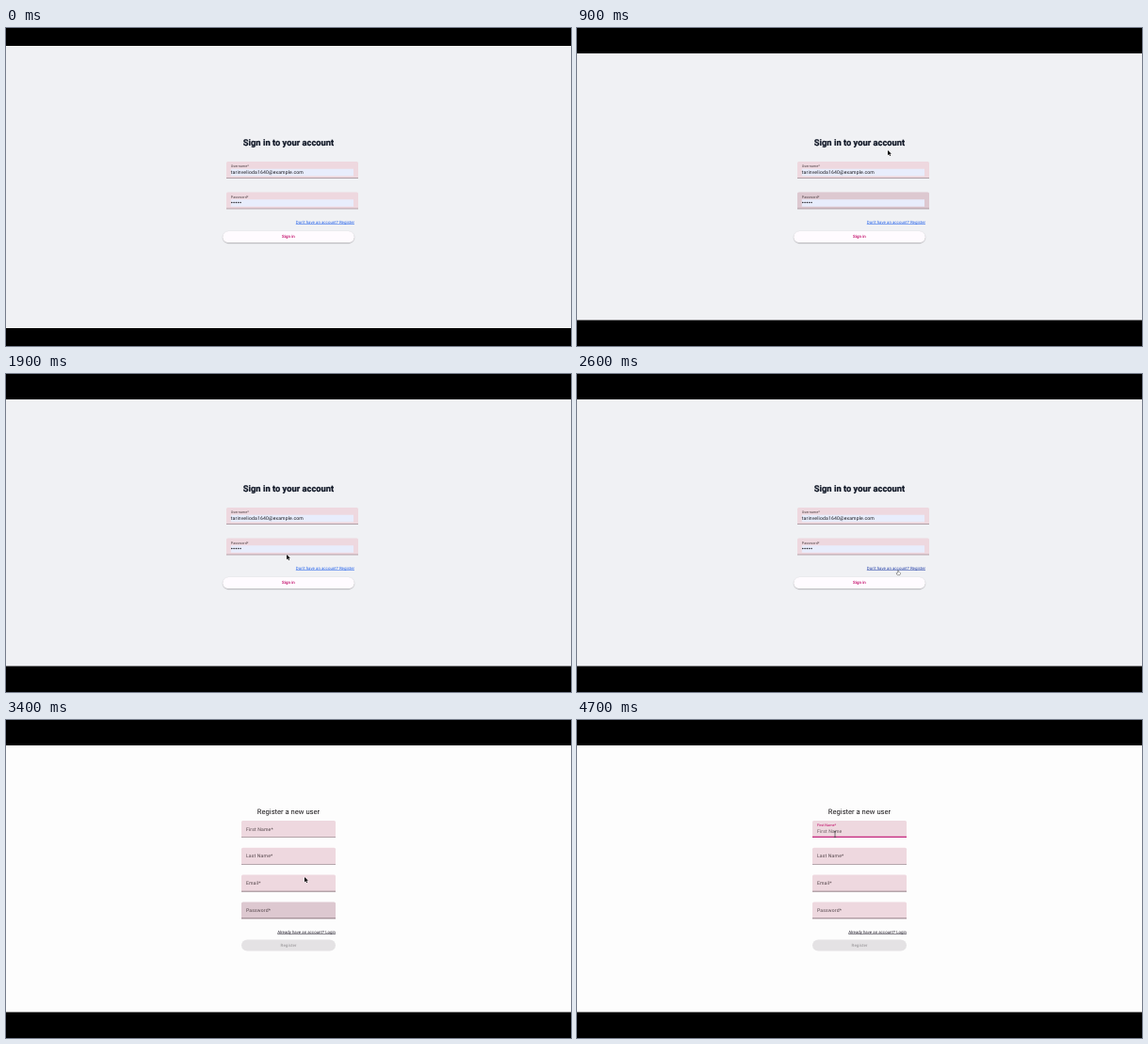
Recreate the animation shown at these times as an HTML page with a canvas. Size 600x338 px, loop 5200 ms.

```html
<!DOCTYPE html>
<html lang="en">
<head>
<meta charset="utf-8">
<title>Sign in and register</title>
<style>
  html, body { margin: 0; width: 100%; height: 100%; overflow: hidden; background: #000; }
  canvas { display: block; width: 100vw; height: 100vh; }
</style>
</head>
<body>
<canvas id="stage"></canvas>
<script>
const W = 600, H = 338, LOOP = 5200, TICK = 100;
const CLICK_LINK = 2900, CLICK_FIELD = 3900;
const FIELD_H = 17.8, TEXT_SCALE = 10;
const canvas = document.getElementById('stage');
const ctx = canvas.getContext('2d');
const ratio = window.devicePixelRatio || 1;
canvas.width = W * ratio;
canvas.height = H * ratio;

const INK = '#524449', PINK = '#bf0062', FIELD = '#eed8df', BLACK = '#17151a';

// Pointer moves: start, duration, and the point reached
const REST = { x: 398.6, y: 250 };
const MOVES = [
  [500, 400, 330, 130],
  [900, 300, 281, 221],
  [1200, 100, 256, 155],
  [1300, 200, 131, 95],
  [1500, 400, 298, 192],
  [1900, 500, 341, 209],
  [3300, 100, 317, 167],
  [3400, 200, 272, 121],
  [4300, 200, 273, 126],
  [4500, 200, 274, 121.5]
];

const ramp = (t, a, b) => Math.min(1, Math.max(0, (t - a) / (b - a)));
const mix = (a, b, k) => a + (b - a) * k;
const inside = (p, x, y, w, h) => p.x >= x && p.x <= x + w && p.y >= y && p.y <= y + h;

function pointerAt(t) {
  return MOVES.reduce((p, [start, duration, x, y]) => {
    const k = ramp(t, start, start + duration) ** 2;
    return { x: mix(p.x, x, k), y: mix(p.y, y, k) };
  }, REST);
}

function rect(x, y, w, h, color, radius = 0) {
  ctx.fillStyle = color;
  ctx.beginPath();
  ctx.roundRect(x, y, w, h, radius);
  ctx.fill();
}

// Text is laid out large and scaled down so that glyphs keep fractional positions.
function text(str, x, y, size, color, { weight = 400, align = 'left', spacing = 0, stroke = 0 } = {}) {
  ctx.save();
  ctx.translate(x, y);
  ctx.scale(1 / TEXT_SCALE, 1 / TEXT_SCALE);
  ctx.font = `${weight} ${size * TEXT_SCALE}px Roboto, sans-serif`;
  ctx.textRendering = 'geometricPrecision';
  ctx.letterSpacing = spacing * TEXT_SCALE + 'px';
  ctx.textAlign = align;
  ctx.fillStyle = ctx.strokeStyle = color;
  ctx.fillText(str, 0, 0);
  if (stroke) {
    ctx.lineWidth = stroke * TEXT_SCALE;
    ctx.strokeText(str, 0, 0);
  }
  const width = ctx.measureText(str).width / TEXT_SCALE;
  ctx.restore();
  return width;
}

function link(str, right, y, color) {
  const w = text(str, right, y, 4.4, color, { align: 'right' });
  rect(right - w, y + 0.5, w, 0.4, color);
}

function field(x, y, w, hover) {
  rect(x, y, w, FIELD_H, FIELD, [1.5, 1.5, 0, 0]);
  if (hover) rect(x, y, w, FIELD_H, 'rgba(33,20,26,.08)', [1.5, 1.5, 0, 0]);
  rect(x, y + 17.2, w, 0.6, '#77656c');
}

function filledField(y, label, hot) {
  field(234, y, 140, inside(hot, 234, y, 140, FIELD_H));
  text(label, 238.8, y + 6, 3.8, INK, { spacing: 0.03 });
  rect(238.8, y + 7.7, 130.2, 7.6, '#e8edfc');
}

function signInPage(hot) {
  rect(0, 0, W, H, '#f0f1f4');
  text('Sign in to your account', 300, 125.3, 9.35, '#111827', { weight: 700, align: 'center', stroke: 0.25 });

  filledField(142, 'Username*', hot);
  text('tarinvelioda1640@example.com', 238.8, 154.8, 5.1, BLACK, { spacing: 0.14 });

  filledField(174.5, 'Password*', hot);
  ctx.fillStyle = BLACK;
  for (let i = 0; i < 5; i++) {
    ctx.beginPath();
    ctx.arc(239.8 + i * 2.3, 185.5, 0.7, 0, Math.PI * 2);
    ctx.fill();
  }

  const overLink = inside(hot, 308, 204, 62, 6);
  link("Don't have an account? Register", 370, 208.1, overLink ? '#2540a8' : '#2563eb');

  const raised = inside(hot, 230, 216, 140, 12.4);
  ctx.save();
  ctx.shadowColor = 'rgba(0,0,0,.35)';
  ctx.shadowBlur = (raised ? 2.4 : 1.2) * ratio;
  ctx.shadowOffsetY = (raised ? 0.8 : 0.6) * ratio;
  rect(230.2, 216, 139.6, 12.3, raised ? '#fdf5fa' : '#fffbff', 6.15);
  ctx.restore();
  text('Sign in', 300, 223.3, 4.45, PINK, { weight: 500, align: 'center', spacing: 0.03 });
}

function firstNameField(t, hot) {
  const focus = ramp(t, CLICK_FIELD, CLICK_FIELD + 300);
  field(250, 107, 100, !focus && inside(hot, 250, 107, 100, FIELD_H));
  text('First Name*', 254.9, 117.6 - 4.5 * focus, mix(5.1, 3.8, focus), focus ? PINK : INK,
    { spacing: 0.16 * (1 - focus) });
  if (!focus) return;
  ctx.globalAlpha = focus;
  rect(250, 123.7, 100, 1.1, '#c90070');
  text('First Name', 254.9, 119.9, 5.1, '#66565c', { spacing: 0.16 });
  ctx.globalAlpha = 1;
  if (t - CLICK_FIELD < 700) rect(254.6, 115.4, 0.5, 5.4, PINK);
}

function registerPage(t, hot) {
  rect(0, 0, W, H, '#fdfdfd');
  text('Register a new user', 300, 99.5, 7.6, '#1a171a', { align: 'center' });
  firstNameField(t, hot);
  ['Last Name*', 'Email*', 'Password*'].forEach((label, i) => {
    const y = 107 + 28.8 * (i + 1);
    field(250, y, 100, inside(hot, 250, y, 100, FIELD_H));
    text(label, 254.9, y + 10.5, 5.1, INK, { spacing: 0.16 });
  });
  link('Already have an account? Login', 350, 226.5, '#211d2b');
  rect(250, 233.4, 100, 12.2, '#e4e2e4', 6.1);
  text('Register', 300, 240.8, 4.45, '#a3a0a3', { weight: 500, align: 'center', spacing: 0.03 });
}

const arrow = new Path2D('M0 0V5.3L1.3 4.1L2.2 6.1L3.1 5.7L2.2 3.8H3.9Z');
const beam = new Path2D('M-1.2 -3.2Q0 -3.2 0 -2.5Q0 -3.2 1.2 -3.2M0 -2.5V2.5M-1.2 3.2Q0 3.2 0 2.5Q0 3.2 1.2 3.2');
const hand = new Path2D('M-.5 0Q0 -.5 .5 0V1.8L1.8 2.2Q2.3 2.4 2.1 3.1L1.7 4.6H-.7L-1.8 2.8Q-1.4 2.2 -.5 2.9Z');

function outlined(path, fill, stroke) {
  ctx.lineWidth = 0.7;
  ctx.strokeStyle = stroke;
  ctx.stroke(path);
  ctx.fillStyle = fill;
  ctx.fill(path);
}

function pointer(p, signedOut) {
  const overInput = signedOut
    ? inside(p, 239, 149.7, 130, 7.6) || inside(p, 239, 182.2, 130, 7.6)
    : inside(p, 255, 114.7, 90, 7.6);
  const overAction = signedOut && (inside(p, 308, 204, 62, 6) || inside(p, 230, 216, 140, 12.4));
  ctx.save();
  ctx.translate(p.x, p.y);
  if (overInput) {
    ctx.lineWidth = 0.65;
    ctx.strokeStyle = '#373237';
    ctx.stroke(beam);
  } else if (overAction) {
    outlined(hand, '#fff', '#111');
  } else {
    outlined(arrow, '#000', '#fff');
  }
  ctx.restore();
}

function draw(now) {
  const t = Math.floor((now % LOOP) / TICK) * TICK;
  const signedOut = t < CLICK_LINK;
  const hot = pointerAt(t - TICK); // hover styles trail the pointer by one tick
  ctx.setTransform(ratio, 0, 0, ratio, 0, 0);
  if (signedOut) signInPage(hot);
  else registerPage(t, hot);
  if (t >= 200) pointer(pointerAt(t), signedOut);

  const close = ramp(t, 0, 300);
  const bottom = mix(319, 310.6, close);
  rect(0, 0, W, mix(18.9, 27, close), '#000');
  rect(0, bottom, W, H - bottom, '#000');
}

let start;
function loop(now) {
  start ??= now;
  draw(Math.max(0, now - start));
  requestAnimationFrame(loop);
}
draw(0);
requestAnimationFrame(loop);
</script>
</body>
</html>
```
